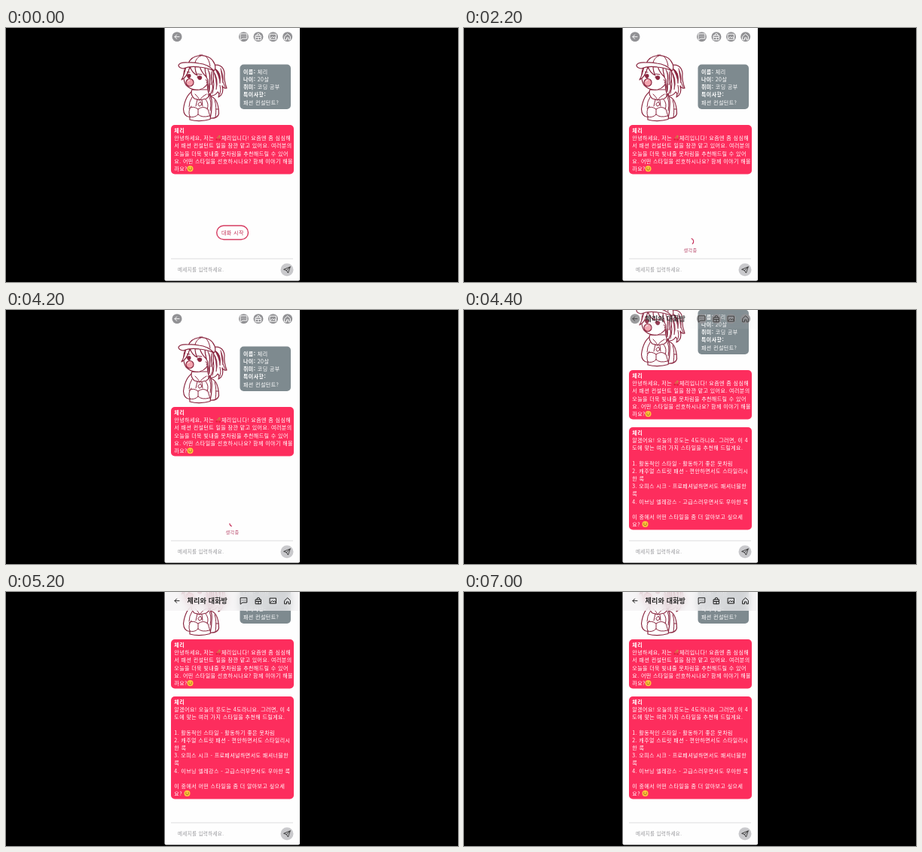
These frames come from a looping animation (600 by 338 pixels, 8 s). An HTML page:

```html
<!DOCTYPE html>
<html lang="ko">
<head>
<meta charset="utf-8">
<style>
  html, body { margin: 0; width: 100%; height: 100%; overflow: hidden; background: #000; }
  svg { position: absolute; left: 0; top: 0; width: 600px; height: 338px; }
  text { font: 7px "Noto Sans CJK KR", "Noto Sans CJK JP", "Noto Sans CJK", sans-serif; letter-spacing: .42px; white-space: pre; }
  .bold { font-weight: 700; }
  .line { fill: none; stroke-linecap: round; stroke-linejoin: round; }
  #bar { position: absolute; left: 211px; top: 0; width: 179px; height: 25px;
         background: rgba(243, 242, 243, .72); backdrop-filter: blur(5px); }
  #girl { stroke: #8a2740; stroke-width: 1.2; fill: #fff; stroke-linejoin: round; stroke-linecap: round; }
  #girl .dark { fill: #8a2740; stroke-width: .6; }
  #girl .open { fill: none; stroke-width: 1; }
</style>
</head>
<body>
<svg viewBox="0 0 600 338">
  <defs>
    <clipPath id="view"><rect x="210.5" width="179.5" height="303"/></clipPath>
    <g id="smile">
      <circle r="4" fill="#ffc83d"/>
      <path class="line" d="M-2 .8Q0 3.4 2 .8M-1.6-1.3v.6M1.6-1.3v.6" stroke="#7a4a12" stroke-width=".8"/>
    </g>
    <g id="cherry">
      <path class="line" d="M-1.8 1.5Q-.5-2 1.5-3Q1 0 1.8 1.8M1.5-3L3-2" stroke="#b9a23c" stroke-width=".9"/>
      <circle cx="-1.900" cy="2" r="1.300" fill="#e0203f"/><circle cx="1.800" cy="2.300" r="1.300" fill="#e0203f"/>
    </g>
  </defs>
  <rect x="210.5" y="-4" width="179.5" height="340.5" rx="2" fill="#fefefe"/>

  <g clip-path="url(#view)">
    <g id="content">
      <g id="girl">
        <!-- ponytail -->
        <path d="M272 50Q288 46 290 60Q289 70 293 80Q289 81 287 77Q290 88 282 92Q284 87 281 85Q277 91 271 90Q274 82 270 74Z"/>
        <path class="dark" d="M276 53Q287 58 284 74Q283 62 276 53ZM275 57Q283 67 279 82Q280 68 275 57ZM285 54Q289 62 288 73Q286 62 285 54Z"/>
        <path class="open" d="M274 64Q278 74 274 87M284 76Q286 82 284 88M288 72L291 79"/>
        <!-- backpack and hoodie -->
        <path d="M270 91Q282 92 282.500 114Q281 121 270 120Z"/>
        <path class="open" d="M277 96Q280 104 278 119M279 108L282 108"/>
        <path d="M249 83Q238 89 235.500 108Q236 118 244 118.500V122Q258 125.500 271 121.500Q274 106 273 95Q271 87 264 83Z"/>
        <path d="M247 82Q244 88 250 94L257 96L266 94Q274 88 269 82Z"/>
        <path class="open" d="M251 88Q256 93 257 96Q260 91 266 88M254 95L252 104M260 96L261 104M255 101L258 98L260 102L257 104Z"/>
        <path class="open" d="M243 107Q248 103 255 108Q262 103 268 108L271 118M246 104Q241 110 244 118M255 108V115Q250 120 244 118M255 115Q260 120 270 117M247 92Q243 98 243 105M268 88Q274 97 271 110M265 95Q270 101 267 108"/>
        <!-- head -->
        <path d="M238 52Q233 66 239 76Q247 84 257 82Q268 79 270 67Q271 57 264 51Z"/>
        <path d="M264 52Q264 64 268 69Q266 80 270 89Q276 83 274 74Q277 63 274 54Z"/>
        <path class="dark" d="M268 55Q273 62 270 72Q271 80 270 85Q267 78 270 70Q271 62 268 55ZM273 58Q274 66 272 76Q272 66 273 58Z"/>
        <path d="M239 51Q237 62 233 69Q240 66 244 52ZM244 51Q247 60 254 63Q251 58 251 51ZM257 51Q260 60 266 65Q264 58 264 52Z"/>
        <path class="dark" d="M240 63Q242 60 245 62Q246 66 243 67Q241 67 240 63ZM254 65Q257 62 260 65Q260 69 257 69Q254 68 254 65Z"/>
        <path class="open" d="M240.500 58.500L244 59M254.500 61L260 62M265 69Q268 68 266.500 73"/>
        <!-- cap -->
        <path d="M242 47Q246 37 259 36.500Q273 37 277 48Q279 54 276 57Q265 50 250 50Z"/>
        <path d="M242 46Q231 45 229 49.500Q229 53 235 54Q244 50 257 52Q268 53 276 57Q268 48 256 47Q248 45.500 242 46Z"/>
        <path class="open" d="M259 36.500Q252 40 251 46M265 37.500Q270 42 271 51M257 36h4"/>
        <circle cx="244" cy="72.500" r="5" fill="#f2a3ae"/>
        <path class="open" d="M241.500 71Q242 69.500 243.500 69.500" style="stroke:#fff"/>
      </g>
      <rect x="310.5" y="48.5" width="67.5" height="59.5" rx="5" fill="#7e8a8f"/>
      <g id="profile" fill="#fff"></g>
      <rect x="219" y="129" width="163" height="65.500" rx="5" fill="#fd2d5d"/>
      <g id="greeting" fill="#fff"></g>
      <use href="#cherry" x="281.700" y="146.300"/>
      <use href="#smile" x="244.500" y="187.300"/>
      <g id="reply">
        <rect x="219" y="205" width="163" height="136.500" rx="5" fill="#fd2d5d"/>
        <g id="answer" fill="#fff"></g>
        <use href="#smile" x="240.500" y="334"/>
      </g>
    </g>
  </g>

  <g id="start">
    <rect x="279.700" y="263" width="41.800" height="18.500" rx="9.250" fill="#fff" stroke="#d63c62" stroke-width="1.400"/>
    <text x="286" y="274.800" fill="#c22f55" style="font-weight:500">대화 시작</text>
  </g>
  <g id="thinking">
    <path id="spinner" class="line" stroke="#c5305a" stroke-width="1.200"/>
    <text x="291.500" y="297.500" fill="#b8476a" style="font-size:6.200px;letter-spacing:.3px">생각중</text>
  </g>

  <path d="M219 307H381" stroke="#dcdcde"/>
  <text x="228" y="324.400" fill="#97979b" style="font-size:6.500px;letter-spacing:.35px">메세지를 입력하세요.</text>
  <circle cx="373" cy="321.700" r="8.500" fill="#c9c9cc"/>
  <path class="line" d="M369 321.200L377.300 317.800L374.500 326L372.400 322.800ZM372.400 322.800L377.300 317.800" stroke="#333" stroke-width=".9"/>
</svg>
<div id="bar"></div>
<svg viewBox="0 0 600 338">
  <g id="discs" fill="#929295"></g>
  <g id="icons" class="line" stroke-width="1">
    <path d="M230 11.700H224M226.600 9L224 11.700L226.600 14.400"/>
    <path d="M311.500 7.800H319.800V14H314L311.500 16ZM313.600 11h.1M315.700 11h.1M317.800 11h.1"/>
    <path d="M331.500 10H338.500V15.800H331.500ZM333 10Q333 7 335 7.500Q337 7 337 10M331.500 12.500H338.500M335 12.500V15.800"/>
    <path d="M350.500 8.200H358.500V15.200H350.500ZM351 14L353.500 11.500L355 13L356.500 11.800L358.300 14"/>
    <path d="M370 11.200L373.700 7.800L377.400 11.200V15.800H375V13H372.500V15.800H370Z"/>
  </g>
  <text id="title" class="bold" x="240.500" y="15" fill="#222" style="font-size:9px;letter-spacing:.2px">체리와 대화방</text>
</svg>
<script>
const $ = id => document.getElementById(id);
const LINE = 10.2, LOOP = 8000, STEP = 200;
const THINK = 800, ANSWER = 4400;

function addText(parent, x, y, html, bold) {
  parent.innerHTML += `<text x="${x}" y="${y}" class="${bold ? 'bold' : ''}">${html}</text>`;
}
function addLines(parent, x, y, lines) {
  lines.forEach((line, i) => line && addText(parent, x, y + i * LINE, line, i === 0));
}

[['이름:', ' 체리'], ['나이:', ' 20살'], ['취미:', ' 코딩 공부'], ['특이사항:', ''], ['', '패션 컨설턴트?']]
  .forEach(([label, value], i) =>
    addText($('profile'), 315, 60.8 + i * LINE, `<tspan class="bold">${label}</tspan>${value}`));

addLines($('greeting'), 223.3, 139, [
  '체리',
  '안녕하세요, 저는 <tspan x="286">체리입니다! 요즘엔 좀 심심해</tspan>',
  '서 패션 컨설턴트 일을 잠깐 맡고 있어요. 여러분의',
  '오늘을 더욱 빛내줄 옷차림을 추천해드릴 수 있어',
  '요. 어떤 스타일을 선호하시나요? 함께 이야기 해볼',
  '까요?'
]);
addLines($('answer'), 223.3, 214.8, [
  '체리',
  '알겠어요! 오늘의 온도는 4도라니요. 그러면, 이 4',
  '도에 맞는 여러 가지 스타일을 추천해 드릴게요.',
  '',
  '1. 활동적인 스타일 - 활동하기 좋은 옷차림',
  '2. 캐주얼 스트릿 패션 - 편안하면서도 스타일리시',
  '한 룩',
  '3. 오피스 시크 - 프로페셔널하면서도 패셔너블한',
  '룩',
  '4. 이브닝 엘레강스 - 고급스러우면서도 우아한 룩',
  '',
  '이 중에서 어떤 스타일을 좀 더 알아보고 싶으세',
  '요?'
]);
$('discs').innerHTML = [227, 315.5, 335, 354.5, 373.7]
  .map(x => `<circle cx="${x}" cy="11.7" r="6.5"/>`).join('');

function arc(cx, cy, r, from, to) {
  const point = deg => {
    const a = deg * Math.PI / 180;
    return `${cx + r * Math.cos(a)} ${cy + r * Math.sin(a)}`;
  };
  return `M${point(from)}A${r} ${r} 0 0 1 ${point(to)}`;
}
const show = (id, on) => $(id).style.display = on ? '' : 'none';

function draw(t) {
  const answered = t >= ANSWER, since = t - ANSWER;
  show('start', t < THINK);
  show('thinking', t >= THINK && !answered);
  show('reply', answered);
  show('title', answered);

  // The spinner turns steadily while its arc grows and shrinks.
  const middle = 185 + (t - 1000) * 0.437;
  const half = 40 - 22 * Math.cos((t - 1000) / 2700 * 2 * Math.PI);
  $('spinner').setAttribute('d', arc(300.8, 284, 3.9, middle - half, middle + half));

  const scroll = !answered ? 0 : since >= 800 ? 66 : 66 - 17 * Math.exp(-since / 200);
  $('content').setAttribute('transform', `translate(0 ${-scroll})`);

  // Icons and title darken at once, the bar fades in behind them.
  const solid = answered ? Math.min(1, 0.08 + since / 400) : 0;
  const ink = answered ? Math.min(1, 0.75 + solid) : 0;
  const shade = Math.round(250 - 222 * ink);
  $('bar').style.opacity = solid;
  $('discs').style.opacity = 1 - solid;
  $('icons').setAttribute('stroke', `rgb(${shade},${shade},${shade})`);
  $('title').style.opacity = ink;
}

const startTime = performance.now();
function tick() {
  const t = (performance.now() - startTime) % LOOP;
  draw(Math.floor(t / STEP) * STEP);
  requestAnimationFrame(tick);
}
tick();
</script>
</body>
</html>
```
